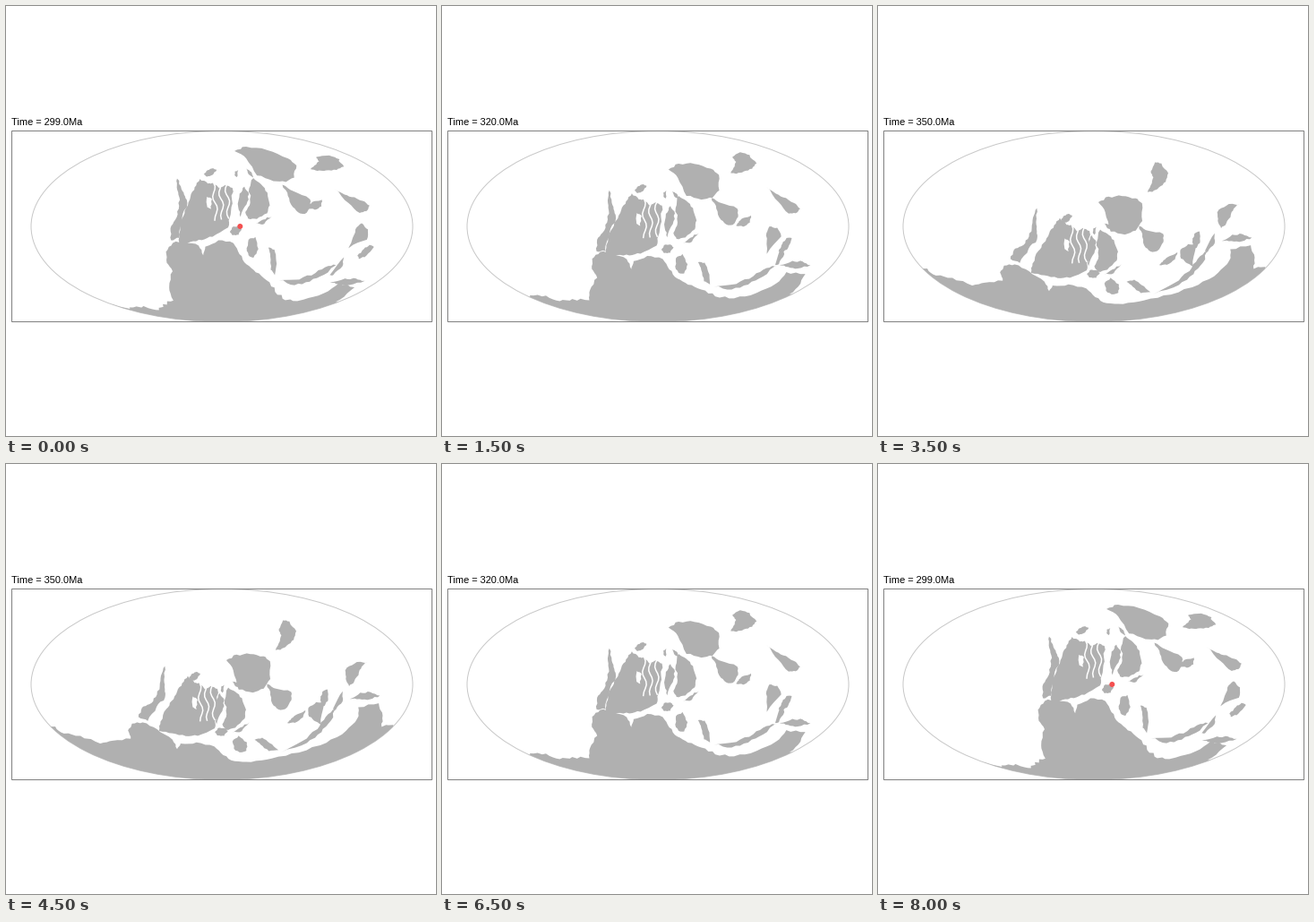
These frames come from a looping animation (480 by 480 pixels, 8.5 s). A matplotlib script:

```python
import numpy as np
import matplotlib.pyplot as plt
from matplotlib.animation import FuncAnimation
from matplotlib.patches import Circle, Ellipse, Polygon, Rectangle

SIZE, DPI = 480, 80
PX = 72 / DPI  # one pixel in points
LAND, RIM, FRAME, DOT = "#b0b0b0", "#c8c8c8", "#808080", "#f45050"
CX, CY, RX, RY = 241, 246, 213, 106.5

STEPS = [299, 305, 310, 320, 325, 330, 340, 350, 359]
TIMELINE = STEPS + STEPS[-2::-1]


def pts(*values):
    return np.array(values, float).reshape(-1, 2)


# Mollweide projection between stage pixels and unit vectors
THETA = np.linspace(-np.pi / 2, np.pi / 2, 2001)
SIN_LAT = (2 * THETA + np.sin(2 * THETA)) / np.pi


def to_sphere(p):
    theta = np.arcsin(np.clip((CY - p[:, 1]) / RY, -0.999, 0.999))
    lon = np.clip(np.pi * (p[:, 0] - CX) / (RX * np.cos(theta)), -np.pi, np.pi)
    z = np.interp(theta, THETA, SIN_LAT)
    r = np.sqrt(1 - z * z)
    return np.column_stack([r * np.cos(lon), r * np.sin(lon), z])


def to_stage(v):
    theta = np.interp(v[:, 2], SIN_LAT, THETA)
    lon = np.arctan2(v[:, 1], v[:, 0])
    return np.column_stack([CX + RX * lon / np.pi * np.cos(theta),
                            CY - RY * np.sin(theta)])


def fit_rotation(start, end):
    """Axis matrix and angle of the rotation that best takes start to end."""
    u, _, vt = np.linalg.svd(to_sphere(start).T @ to_sphere(end))
    flip = np.diag([1, 1, np.linalg.det(vt.T @ u.T)])
    rot = vt.T @ flip @ u.T
    angle = np.arccos(np.clip((np.trace(rot) - 1) / 2, -1, 1))
    return (rot - rot.T) / (2 * np.sin(angle) + 1e-12), angle


def phase(age):
    """-1 at the youngest pose, 0 where outlines are drawn, 1 at the old pose."""
    return np.interp(age, [299, 320, 330, 350, 359], [-1, -0.46, 0, 1, 1.1])


def spinner(marks, young, old):
    """Rotation of a plate by age, from where its marks lie at both ends."""
    back, ahead = fit_rotation(marks, young), fit_rotation(marks, old)

    def spin(age):
        k = phase(age)
        axis, angle = back if k < 0 else ahead
        a = abs(k) * angle
        return np.eye(3) + np.sin(a) * axis + (1 - np.cos(a)) * axis @ axis
    return spin


def coast(outline, seed, parts=4):
    """Split every edge and push the new points sideways for a ragged shore."""
    rng = np.random.default_rng(seed)
    edge = np.roll(outline, -1, axis=0) - outline
    length = np.hypot(*edge.T)[:, None]
    normal = np.column_stack([-edge[:, 1], edge[:, 0]]) / length
    reach = np.minimum(length * 0.08, 1.2)
    rows = [outline]
    for k in range(1, parts):
        push = rng.uniform(-1, 1, (len(outline), 1))
        rows.append(outline + edge * k / parts + normal * reach * push)
    return np.stack(rows, axis=1).reshape(-1, 2)


def polar_cap(v):
    """Project a shore that runs once around the south pole and fill below it."""
    lon = np.arctan2(v[:, 1], v[:, 0])
    cut = np.argmax(np.abs(np.diff(lon, append=lon[0]))) + 1
    shore = to_stage(np.roll(v, -cut, axis=0))
    if shore[0, 0] > shore[-1, 0]:
        shore = shore[::-1]
    left, right = shore[0, 1], shore[-1, 1]
    return np.vstack([pts(0, left), shore,
                      pts(SIZE, right, SIZE, 365, 0, 365)])


# The southern continent: its shore from west to east, and three marks on it
SOUTH = pts(70, 310, 88, 311, 101, 318, 118, 318, 140, 323, 147, 315, 160, 306,
            155, 296, 157, 286, 167, 281, 182, 285, 198, 294, 203, 305, 206, 297,
            222, 293, 240, 297, 248, 308, 258, 317, 272, 322, 290, 324, 312, 326,
            340, 322, 366, 312, 384, 300, 391, 287, 414, 286, 412, 300, 405, 312)
SOUTH_SPIN = spinner(SOUTH[[9, 12, 25]],
                     pts(188, 261, 219, 276, 394, 309),
                     pts(150, 291, 191, 318, 418, 270))

# Outline, then where its first and its halfway point lie at the young
# and at the old pose
WEST = (pts(207, 223, 214, 231, 220, 232, 225, 239, 232, 236, 239, 240, 238, 258,
            234, 274, 232, 284, 213, 291, 200, 291, 186, 288, 172, 286, 174, 275,
            181, 260, 187, 251, 194, 240, 200, 231),
        pts(216, 191, 231, 260), pts(203, 237, 214, 303))
PLATES = [
    WEST,
    # western spur and island
    (pts(182, 217, 183, 232, 185, 242, 186, 251, 178, 264, 171, 283, 161, 281,
         163, 269, 170, 263, 176, 253, 179, 240, 179, 228),
     pts(190, 196, 184, 258), pts(177, 226, 148, 282)),
    (pts(210, 222, 214, 217, 219, 215, 223, 217, 219, 223, 213, 225),
     pts(221, 188, 235, 183), pts(204, 239, 217, 234)),
    # central blocks
    (pts(246, 243, 251, 251, 249, 263, 243, 278, 240, 268, 241, 252),
     pts(266, 203, 262, 234), pts(239, 254, 235, 292)),
    (pts(256, 232, 264, 236, 272, 243, 277, 256, 276, 266, 266, 277, 256, 280,
         252, 274, 256, 262, 253, 246),
     pts(276, 191, 280, 239), pts(248, 249, 256, 295)),
    (pts(262, 284, 270, 277, 279, 270, 272, 281),
     pts(279, 243, 296, 235), pts(252, 300, 272, 288)),
    (pts(240, 288, 244, 283, 250, 283, 254, 286, 250, 292, 243, 292),
     pts(250, 252, 263, 249), pts(234, 299, 247, 298)),
    (pts(250, 232, 255, 234, 258, 240, 253, 238),
     pts(268, 181, 276, 192), pts(252, 242, 262, 250)),
    (pts(242, 231, 245, 228, 245, 237, 243, 236),
     pts(255, 184, 258, 192), pts(240, 248, 242, 256)),
    # northern blocks
    (pts(249, 202, 260, 195, 276, 194, 292, 197, 300, 203, 301, 222, 294, 232,
         282, 236, 266, 233, 258, 212),
     pts(256, 162, 321, 191), pts(246, 219, 295, 240)),
    (pts(294, 228, 305, 233, 322, 237, 323, 246, 317, 256, 312, 257, 304, 252,
         299, 240),
     pts(306, 197, 335, 235), pts(291, 245, 312, 274)),
    (pts(319, 262, 323, 257, 329, 253, 337, 250, 335, 258, 327, 263),
     pts(336, 226, 353, 216), pts(314, 289, 334, 275)),
    (pts(309, 193, 313, 184, 314, 178, 310, 172, 315, 164, 324, 166, 333, 176,
         330, 184, 322, 189, 315, 193),
     pts(340, 182, 372, 171), pts(301, 207, 316, 176)),
    # eastern wedge, blocks and strips
    (pts(358, 199, 366, 206, 376, 213, 388, 221, 394, 228, 388, 232, 380, 231,
         370, 217),
     pts(361, 202, 411, 226), pts(403, 222, 384, 247)),
    (pts(341, 264, 350, 261, 357, 267, 346, 290, 342, 282, 339, 272),
     pts(395, 248, 386, 265), pts(339, 274, 350, 289)),
    (pts(359, 276, 361, 267, 364, 260, 370, 258, 369, 269, 364, 276),
     pts(394, 278, 409, 270), pts(352, 268, 358, 254)),
    (pts(303, 319, 330, 314, 350, 304, 365, 294, 378, 289, 362, 303, 345, 313,
         325, 320),
     pts(300, 306, 377, 285), pts(315, 318, 366, 276)),
    (pts(377, 259, 383, 266, 381, 277, 377, 279),
     pts(376, 283, 367, 298), pts(377, 248, 365, 280)),
    (pts(384, 272, 397, 267, 408, 268, 417, 273, 405, 276, 394, 274),
     pts(366, 309, 394, 308), pts(387, 262, 414, 259)),
    # blocks off the southern shore
    (pts(255, 300, 262, 294, 270, 303, 268, 313, 262, 314, 257, 311),
     pts(271, 262, 276, 280), pts(253, 310, 268, 320)),
    (pts(281, 300, 289, 299, 295, 307, 301, 318, 292, 317, 286, 307),
     pts(293, 270, 300, 300), pts(279, 309, 302, 319)),
]

fig = plt.figure(figsize=(SIZE / DPI, SIZE / DPI), dpi=DPI, facecolor="white")
ax = fig.add_axes([0, 0, 1, 1])
ax.set(xlim=(0, SIZE), ylim=(SIZE, 0))
ax.axis("off")

globe = Ellipse((CX, CY), 2 * RX, 2 * RY, fc="none", ec=RIM, lw=PX)
ax.add_patch(globe)
ax.add_patch(Rectangle((6.5, 139.5), 469, 213, fc="none", ec=FRAME, lw=PX,
                       zorder=5, snap=False))
label = ax.text(6.4, 133, "", fontsize=11 * PX, family="Liberation Sans",
                color="black", va="baseline")
marker = ax.add_patch(Circle((261.3, 246), 3, fc=DOT, lw=0, zorder=6))

movers = []  # functions that place one shape for an age


def add_area(shape, spin, color=LAND, project=to_stage):
    patch = ax.add_patch(Polygon(shape, fc=color, lw=0))
    patch.set_clip_path(globe)
    v = to_sphere(shape)
    movers.append(lambda age: patch.set_xy(project(v @ spin(age).T)))


def add_slit(shape, spin):
    line, = ax.plot([], [], color="white", lw=1.5 * PX)
    v = to_sphere(shape)
    movers.append(lambda age: line.set_data(*to_stage(v @ spin(age).T).T))


open_shore = coast(SOUTH, 1)[:-3]  # without the edge that would close it
add_area(open_shore, SOUTH_SPIN, project=polar_cap)

for seed, (outline, young, old) in enumerate(PLATES):
    spin = spinner(outline[[0, len(outline) // 2]], young, old)
    add_area(coast(outline, 10 + seed), spin)
    if seed == 0:
        west_spin = spin

# inlet and winding channels of the western continent
add_area(coast(pts(211, 246, 216, 250, 214, 261, 210, 258), 5), west_spin, "white")
for x in (219, 226, 233):
    y = np.linspace(232, 274, 12)
    add_slit(np.column_stack([x + 2 * np.sin(y / 4 + x), y]), west_spin)


def update(step):
    age = TIMELINE[step]
    for move in movers:
        move(age)
    label.set_text(f"Time = {age:.1f}Ma")
    marker.set_visible(age == 299)
    return []


anim = FuncAnimation(fig, update, frames=len(TIMELINE), interval=500,
                     repeat=True, repeat_delay=0, blit=False)
plt.show()
```
